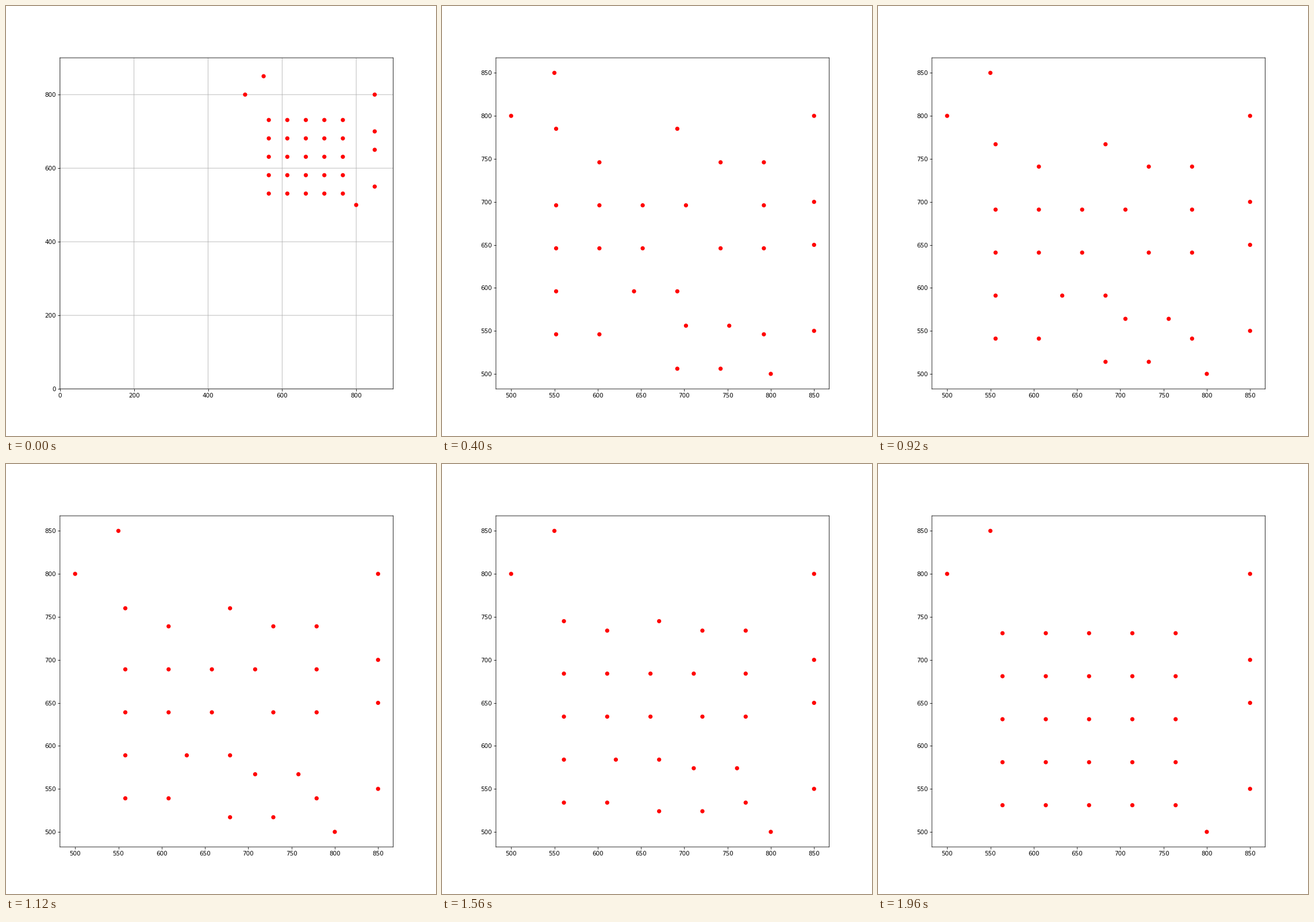
Animation, 748 px wide and 748 px high, one loop 4 s. Source, as a matplotlib script:

```python
import numpy as np
import matplotlib.pyplot as plt
from matplotlib.animation import FuncAnimation

INCHES, DPI = 10, 74.8
FRAMES, INTERVAL = 100, 40
STEPS = 49
GAP = 50

# Dots that stay: four down the right side, three around the corners.
FIXED = [(850, y) for y in (800, 700, 650, 550)]
FIXED += [(550, 850), (500, 800), (800, 500)]

col, row = np.meshgrid(np.arange(5), np.arange(5))
END = np.stack([564 + GAP * col, 731 - GAP * row], axis=-1)

# Each row opens at one column: the dots from there on start a cell further right.
opening = np.array([2, 4, 3, 1, 2])
right = (col >= opening[:, None]).astype(int)
up = np.zeros_like(right)
right[3, 3:] = 0
up[0, [0, 2]] = 1
up[3, 3:] = up[4, 2:4] = -1
START = np.stack([550 + GAP * (col + right), 750 - GAP * (row - up)], axis=-1)

plt.rcParams["path.snap"] = False
fig, ax = plt.subplots(figsize=(INCHES, INCHES), dpi=DPI)
fig.subplots_adjust(left=0.1255, right=0.9005, bottom=0.1095, top=0.8795)

count = len(FIXED) + col.size
dots = ax.scatter(np.zeros(count), np.zeros(count), s=np.full(count, 49),
                  color="red", linewidth=0, zorder=2)


def set_view(low, high, ticks):
    ax.set(xlim=(low, high), ylim=(low, high), xticks=ticks, yticks=ticks)


def positions(step):
    """Straight, even motion to the square lattice, in whole units."""
    return START + (END - START) * step // STEPS


def update(i):
    if i == 0:
        set_view(0, 900, range(0, 900, 200))
        moving = END
    else:
        set_view(482.5, 867.5, range(500, 900, 50))
        moving = positions(min(i, STEPS))
    ax.grid(i == 0)
    dots.set_offsets(np.vstack([FIXED, moving.reshape(-1, 2)]))
    return dots,


anim = FuncAnimation(fig, update, frames=FRAMES, interval=INTERVAL,
                     init_func=lambda: update(0), repeat=True, repeat_delay=0)
plt.show()
```
